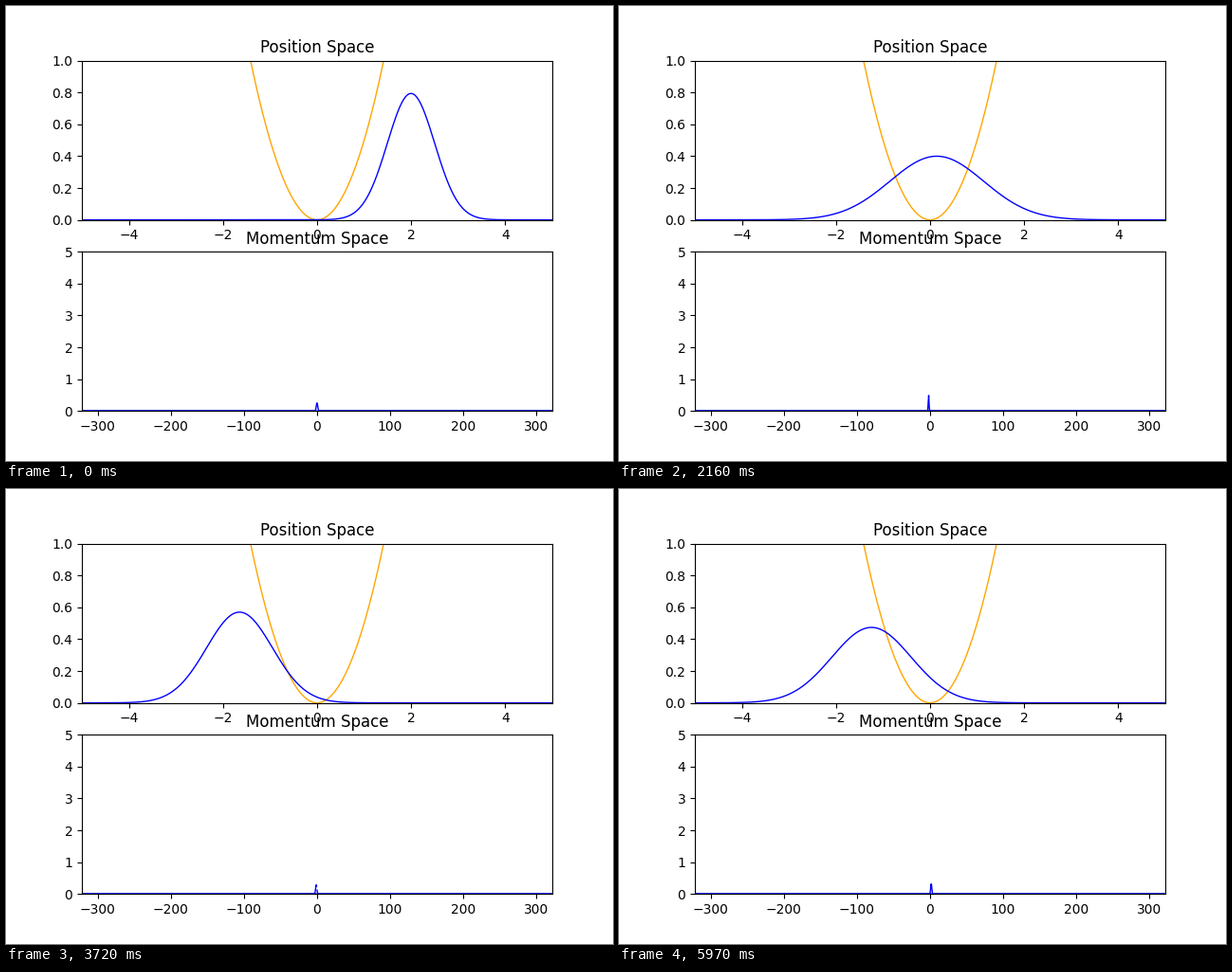
These frames come from a looping animation (640x480 px, 6000 ms). A matplotlib script:

```python
import numpy as np
import matplotlib.pyplot as plt
from matplotlib.animation import FuncAnimation

# Displaced, squeezed wave packet in a harmonic trap (hbar = m = omega = 1)
N, X_MAX = 1024, 5.0
X0, VAR_X = 2.0, 0.25
VAR_P = 1 / (4 * VAR_X)
FRAMES, INTERVAL, DT = 200, 30, 0.02
T_POS, T_MOM = 0.06, 0.055  # momentum is sampled slightly before position

x = np.linspace(-X_MAX, X_MAX, N)
dx = 2 * X_MAX / N
k = 2 * np.pi * np.fft.fftfreq(N, dx)
k_max = np.pi / dx
K_SCALE = 2 * np.pi / (N * dx)  # unitary DFT normalisation


def gauss(u, mean, var):
    return np.exp(-(u - mean) ** 2 / (2 * var)) / np.sqrt(2 * np.pi * var)


def position_density(t):
    c, s = np.cos(t), np.sin(t)
    return gauss(x, X0 * c, VAR_X * c**2 + VAR_P * s**2)


def momentum_density(t):
    c, s = np.cos(t), np.sin(t)
    return K_SCALE * gauss(k, -X0 * s, VAR_P * c**2 + VAR_X * s**2)


fig, (ax_x, ax_k) = plt.subplots(2, 1, figsize=(6.4, 4.8), dpi=100)

ax_x.set_title("Position Space")
ax_x.set_xlim(-X_MAX, X_MAX)
ax_x.set_ylim(0, 1)
ax_x.plot(x, x**2 / 2, color="orange", lw=1)
pos_line, = ax_x.plot(x, position_density(T_POS), color="blue", lw=1)

ax_k.set_title("Momentum Space")
ax_k.set_xlim(-k_max, k_max)
ax_k.set_ylim(0, 5)
mom_line, = ax_k.plot(k, momentum_density(T_MOM), color="blue", lw=1)


def update(i):
    pos_line.set_ydata(position_density(T_POS + i * DT))
    mom_line.set_ydata(momentum_density(T_MOM + i * DT))
    return pos_line, mom_line


anim = FuncAnimation(fig, update, frames=FRAMES, interval=INTERVAL,
                     repeat=True, repeat_delay=0, blit=False)
plt.show()
```
